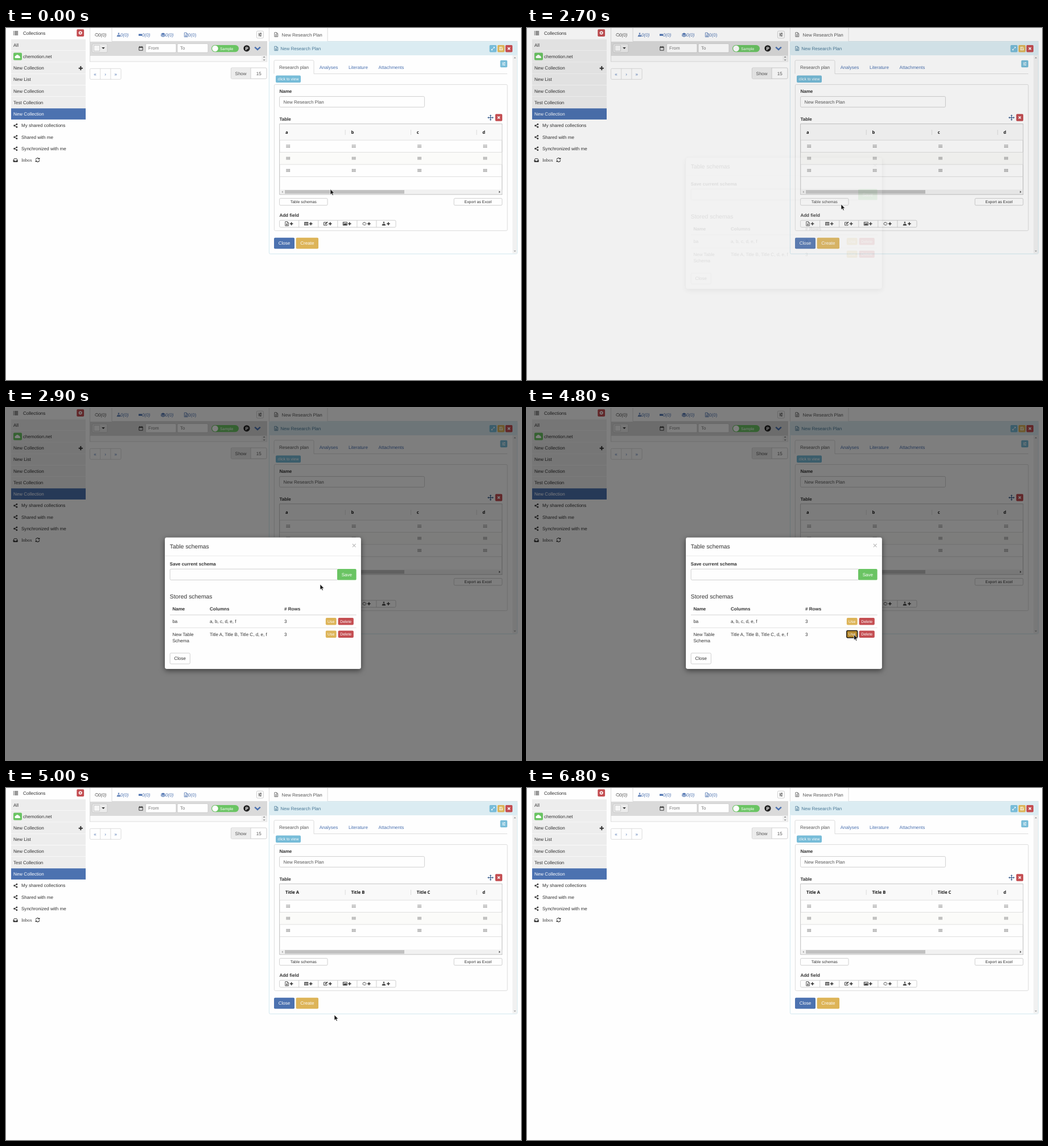
An HTML page for the animation above (7000 ms loop, 905 by 619 pixels).

```html
<!DOCTYPE html>
<html lang="en">
<head>
<meta charset="utf-8">
<title>Table schemas</title>
<style>
html, body { margin: 0; width: 100%; height: 100%; overflow: hidden; background: #fefefe; }
svg { display: block; }
text { font: 8.05px "Liberation Sans", Arial, sans-serif; text-rendering: geometricPrecision; white-space: pre; }
.s { font-size: 6.9px; }
.h { font-size: 10.35px; }
.b { font-weight: bold; }
.i { font-style: italic; }
.g { font: bold 7.6px "Open Sans", "Noto Sans", sans-serif; }
.f { font-family: "Liberation Serif", serif; }
#modal .panel { filter: drop-shadow(0 3px 5px rgba(0, 0, 0, .5)); }
</style>
</head>
<body>
<svg id="stage" width="905" height="619" viewBox="0 0 905 619"></svg>
<script>
const WHITE = '#fefefe', INK = '#333', GREY = '#555', LINE = '#d4d4d4', EDGE = '#c4c4c4';
const BLUE = '#4c72b0', RED = '#c44e52', GOLD = '#ddb458', GREEN = '#6ac463', CYAN = '#77bcd8';

const text = (x, y, str, fill = INK, cls = '', anchor = 'start') =>
  `<text x="${x}" y="${y}" fill="${fill}" class="${cls}" text-anchor="${anchor}">${str}</text>`;
const box = (x, y, w, h, fill = WHITE, stroke = 'none', r = 0, extra = '') =>
  `<rect x="${x}" y="${y}" width="${w}" height="${h}" rx="${r}" fill="${fill}" stroke="${stroke}" stroke-width=".8" ${extra}/>`;
const line = (d, stroke = LINE, w = .8) => `<path d="${d}" fill="none" stroke="${stroke}" stroke-width="${w}"/>`;
const button = (x, y, w, h, label, fill, color, stroke = 'none', cls = '', extra = '') =>
  box(x, y, w, h, fill, stroke, 1.9, extra) +
  text(x + w / 2, y + h / 2 + (cls ? 2.4 : 2.9), label, color, cls, 'middle');

// Icons are drawn around their own centre.
const icons = {
  list: c => line('M-2-3H4.2M-2-1H4.2M-2 1H4.2M-2 3H4.2', c, 1.2) + line('M-4.2-3h1.3M-4.2-1h1.3M-4.2 1h1.3M-4.2 3h1.3', c, 1.2),
  gear: c => `<circle r="2" fill="none" stroke="${c}" stroke-width="1.5"/><circle r="2.8" fill="none" stroke="${c}" stroke-width="1" stroke-dasharray="1.1"/>`,
  cloud: c => `<path d="M-3 3a2 2 0 0 1-.3-4 2.8 2.8 0 0 1 5.2-.6 2.2 2.2 0 0 1 2 2 1.4 1.4 0 0 1-.6 2.6z" fill="${c}"/>`,
  plus: c => line('M0-3.6V3.6M-3.6 0H3.6', c, 2),
  smallPlus: c => line('M0-2.8V2.8M-2.8 0H2.8', c, 1.6),
  share: c => line('M2.2-2.4L-2 0l4.2 2.4', c, 1) + [[2.2, -2.4], [-2, 0], [2.2, 2.4]].map(p => `<circle cx="${p[0]}" cy="${p[1]}" r="1.4" fill="${c}"/>`).join(''),
  inbox: c => `<path d="M-3.6 0L-2.2-2.6H2.2L3.6 0V2.8H-3.6z" fill="none" stroke="${c}"/><path d="M-3.6.2h2l.6 1.1h2l.6-1.1h2v2.6h-7.2z" fill="${c}"/>`,
  refresh: c => line('M-3.3-.4A3.3 3.3 0 0 1 2.6-2M3.3.4A3.3 3.3 0 0 1-2.6 2', c, 1.1) + `<path d="M3.8-4v3h-3zM-3.8 4v-3h3z" fill="${c}"/>`,
  ring: c => `<path d="M-1.6-2.2H1.6L3.2 0 1.6 2.2H-1.6L-3.2 0z" fill="none" stroke="${c}" stroke-width=".9" stroke-dasharray="3.2 .6"/>`,
  flask: c => `<path d="M-1.2-3H1.2M-.6-3V-.8L-3 2.7H3L.6-.8V-3" fill="none" stroke="${c}" stroke-width=".8"/><path d="M-1.7.8H1.7L3 2.7H-3z" fill="${c}"/>`,
  bar: c => box(-3, -1.5, 6, 3.2, c),
  stack: c => `<path d="M0-3.4L4-1.5 0 .4-4-1.5z" fill="${c}"/>` + line('M-4 0L0 1.8 4 0M-4 1.6L0 3.4 4 1.6', c, 1),
  file: c => `<path d="M-2.9-3.7H.8L2.9-1.6V3.7H-2.9z" fill="none" stroke="${c}" stroke-width=".8"/>` + line('M.7-3.6v2.1h2M-1.5 0h3M-1.5 1.3h3M-1.5 2.5h3', c, .7),
  sliders: c => line('M-3-2.2H3M-3 0H3M-3 2.2H3', c, .7) + line('M1.2-3v1.6M-1.2-.8V.8M.8 1.4V3', c, 1.3),
  calendar: c => `<path d="M-3.2-2.5H3.2V3.5H-3.2z" fill="none" stroke="${c}" stroke-width=".9"/>` + line('M-3.2-1.9H3.2', c, 1.6) + line('M-1.7-4v2M1.7-4v2', c, 1),
  chevron: c => line('M-4.8-2L0 2.4 4.8-2', c, 2.4),
  caret: c => `<path d="M-2.8-1.4H2.8L0 1.6z" fill="${c}"/>`,
  up: c => `<path d="M-2 1H2L0-1.2z" fill="${c}"/>`,
  down: c => `<path d="M-2-1H2L0 1.2z" fill="${c}"/>`,
  left: c => `<path d="M1-2V2L-1.2 0z" fill="${c}"/>`,
  right: c => `<path d="M-1-2V2L1.2 0z" fill="${c}"/>`,
  expand: c => line('M-2.2 2.2L2.2-2.2', c, .9) + `<path d="M3-3v2.8L.2-3zM-3 3V.2L-.2 3z" fill="${c}"/>`,
  save: c => `<path d="M-2.6-2.6H1.6L2.6-1.6V2.6H-2.6z" fill="none" stroke="${c}" stroke-width=".8"/>` + line('M-1.2-2.4v1.5h2v-1.5M-1.4 2.5V.7h2.8v1.8', c, .7),
  cross: c => line('M-2-2L2 2M2-2L-2 2', c, 1.6),
  move: c => line('M0-4V4M-4 0H4', c, 1.1) + `<path d="M0-5.4L1.9-3.2H-1.9zM0 5.4L1.9 3.2H-1.9zM-5.4 0L-3.2-1.9V1.9zM5.4 0L3.2-1.9V1.9z" fill="${c}"/>`,
  table: c => box(-3.5, -2.9, 7, 5.8, c) + line('M-3.2-.9H3.2M-3.2 1H3.2M-1.2-1.6V2.6M1.2-1.6V2.6', WHITE, .6),
  edit: c => line('M1.2-2.5H-3.2V2.8H2.3V.8', c, .9) + line('M-1 .9L3.3-3.2', c, 1.5),
  image: c => `<path d="M-3.6-2.8H3.6V2.8H-3.6z" fill="none" stroke="${c}" stroke-width=".9"/><path d="M-2.8 2.2V.8l1.4-1.4 1 1L1.5-1.4 2.8.2v2z" fill="${c}"/><circle cx="-1.8" cy="-1.2" r=".7" fill="${c}"/>`,
  dots: c => `<path d="M-3.2-1.9h6.6M-3.2 0h6.6M-3.2 1.9h6.6" stroke="${c}" stroke-width="1.1" stroke-dasharray="1.1 .7" fill="none"/>`
};
const icon = (name, x, y, color = INK) => `<g transform="translate(${x} ${y})">${icons[name](color)}</g>`;
const iconButton = (name, x, y, fill, size = 12.4) =>
  box(x, y, size, size, fill, 'none', 1.7) + icon(name, x + size / 2, y + size / 2, WHITE);

function sidebar() {
  const names = ['All', 'chemotion.net', 'New Collection', 'New List', 'New Collection', 'Test Collection',
    'New Collection', 'My shared collections', 'Shared with me', 'Synchronized with me'];
  let out = icon('list', 17, 9) + text(30, 12, 'Collections') + iconButton('gear', 124.3, 2.2, RED, 12.8);
  names.forEach((name, n) => {
    const y = 19.8 + 20.25 * n, on = n === 6, shared = n > 6;
    if (!shared) out += box(9, y, 131, 19.6, on ? BLUE : '#ededed');
    else out += icon('share', 16.7, y + 10.2);
    out += text(shared ? 27 : n === 1 ? 30 : 13, y + 12.8, name, on ? WHITE : INK);
  });
  return out + box(13, 43.5, 15, 13, GREEN, 'none', 1.8) + icon('cloud', 20.5, 50, WHITE) + icon('plus', 131.3, 70.7) +
    icon('inbox', 16.6, 232.4) + text(27, 235.4, 'Inbox', INK, 'f') + icon('refresh', 55.5, 232);
}

function listPanel() {
  const tabs = [['ring', 159.5, 162], ['flask', 198, 201], ['bar', 236, 239], ['stack', 276, 280], ['file', 316.3, 320]];
  let out = line('M147.5 24V0M186 0V23.5H459');
  tabs.forEach(([name, x, tx], n) => {
    const c = n ? BLUE : GREY;
    out += icon(name, x, 12, c) + text(tx, 15, '0(0)', c, n < 4 ? 'i' : '');
  });
  out += box(440.4, 5.4, 12, 12.4, WHITE, EDGE, 1.8) + icon('sliders', 446.4, 11.6);
  out += box(147, 24, 312, 24, '#dadada') + box(151.4, 28, 26.6, 15, '#ebebeb', EDGE, 1.8) +
    box(154.4, 30.6, 10, 10, '#f6f6f6', EDGE) + icon('caret', 171, 35.5) + icon('calendar', 237, 35.8) +
    box(245.4, 27.6, 53.6, 15.6, WHITE, EDGE, 1.8) + text(250, 38.3, 'From', '#777') +
    box(301, 27.6, 54, 15.6, WHITE, EDGE, 1.8) + text(306, 38.3, 'To', '#777') +
    box(361, 30, 48, 12.2, GREEN, 'none', 6.1) + `<circle cx="367.5" cy="36.1" r="5.3" fill="${WHITE}"/>` +
    text(376, 38.6, 'Sample', WHITE, 's') +
    `<circle cx="423" cy="35.8" r="5.6" fill="#222"/>` + text(423.1, 38.5, 'P', WHITE, 'b', 'middle') + icon('chevron', 442, 35.6, BLUE);
  out += box(147.4, 48.4, 311.2, 10.6, '#fafafa', LINE) + box(449, 48.6, 9.4, 10.2, '#f1f1f1') +
    icon('up', 453.6, 51, '#888') + icon('down', 453.6, 56.4, '#888');
  out += box(147.5, 71.3, 54.6, 19, WHITE, LINE, 1.9) + line('M165.7 71.3v19M183.9 71.3v19');
  ['«', '›', '»'].forEach((s, n) => out += text(156.6 + 18.1 * n, 83.8, s, BLUE, '', 'middle'));
  return out + box(395.4, 70, 62.6, 19.2, WHITE, EDGE, 1.9) + box(395.8, 70.4, 34, 18.4, '#ececec', 'none', 1.5) +
    line('M430 70v19.2', EDGE) + text(412.6, 83, 'Show', GREY, '', 'middle') + text(444.2, 83, '15', GREY, '', 'middle');
}

function grid() {
  let out = box(480.8, 168.8, 391, 124, WHITE, '#a9a9a9') + box(481.2, 169.2, 390.2, 28, '#f9f9f9') +
    box(481.2, 218.6, 390.2, 21.4, '#fbfbf9') + line('M481 197.2H871.5M481 218.5H871.5M481 240H871.5M481 261.4H871.5', '#d9d9d9') +
    line('M596.2 179v9M711.5 179v9M827 179v9');
  for (let col = 0; col < 4; col++) {
    const x = 491 + 115.4 * col;
    out += `<text class="g head" x="${x}" y="186" fill="#111"></text>`;
    for (let row = 0; row < 3; row++) out += icon('dots', x + 4.7, 207.7 + 21.4 * row, '#666');
  }
  return out + box(481.2, 284.2, 390.2, 8, '#f1f1f1') + icon('left', 485.6, 288.2, '#a0a0a0') +
    icon('right', 867.4, 288.2, '#444') + box(490, 285, 210, 6.4, '#c1c1c1', 'none', 0, 'id="thumb"');
}

function planPanel() {
  let out = line('M462.4 24V0M565 0V23.5H899') + icon('file', 474.8, 11.6, GREY) + text(484.6, 14.6, 'New Research Plan', GREY) +
    box(462.4, 23.8, 436.2, 373.4, WHITE, '#c6e2ec', 2) + box(462.8, 24.2, 435.4, 23.8, '#dbecf2', 'none', 2) +
    icon('file', 474.8, 36, '#4a7896') + text(482.2, 39, 'New Research Plan', '#4a7896') +
    iconButton('expand', 849.6, 30, CYAN) + iconButton('save', 863.7, 30, GOLD) + iconButton('cross', 877.6, 30, RED) +
    box(890, 48, 8.2, 348.6, '#f1f1f1') + icon('up', 894.2, 52.2, '#999') + icon('down', 894.2, 392.4, '#999');
  out += line('M471 80.5V58.8q0-2 2-2h66q2 0 2 2V80.5H881') + text(480, 71.7, 'Research plan', GREY);
  [['Analyses', 550.7], ['Literature', 602], ['Attachments', 654.6]].forEach(t => out += text(t[1], 71.7, t[0], BLUE));
  out += iconButton('sliders', 868.5, 56.8, CYAN) + button(474, 83.6, 44, 12.4, 'click to view', CYAN, WHITE, 'none', 's') +
    box(471.4, 99.4, 409.6, 257, WHITE, LINE, 1.9) + text(480.4, 114.4, 'Name', INK, 'b') +
    box(480.6, 120.4, 254.8, 18.8, WHITE, EDGE, 1.9) + text(487.6, 132.8, 'New Research Plan', GREY) +
    text(480.4, 162.8, 'Table', INK, 'b') + icon('move', 851.5, 157.6, '#3d6190') + iconButton('cross', 859.7, 151.3, RED) + grid();
  out += button(480.6, 299.6, 84.4, 12.2, 'Table schemas', WHITE, INK, EDGE, 's', 'id="schemas"') +
    button(787.2, 299.6, 84.6, 12.2, 'Export as Excel', WHITE, INK, EDGE, 's') + text(480.4, 332, 'Add field', INK, 'b') +
    box(480.6, 338.2, 204.4, 12.2, WHITE, EDGE, 1.9);
  ['file', 'table', 'edit', 'image', 'ring', 'flask'].forEach((name, n) => {
    const x = 480.6 + 34.06 * n;
    if (n) out += line(`M${x} 338.2v12.2`, EDGE);
    out += icon(name, x + 13, 344.2) + icon('smallPlus', x + 21, 344.2);
  });
  return out + button(471, 368.8, 36, 19.4, 'Close', BLUE, WHITE) + button(509.6, 368.8, 39.4, 19.4, 'Create', GOLD, WHITE);
}

function modal() {
  const row = (y, cells, cls) => cells.map((c, n) => text([292.4, 358, 489][n], y, c, INK, cls)).join('');
  const actions = (y, extra) => button(561.8, y, 18.8, 12.4, 'Use', GOLD, WHITE, 'none', 's', extra) +
    button(583.6, y, 27.2, 12.4, 'Delete', RED, WHITE, 'none', 's');
  return box(279, 227.6, 345, 231.4, WHITE, 'rgba(0,0,0,.2)', 3.4, 'class="panel"') +
    text(287.8, 247, 'Table schemas', INK, 'h') + line('M608.9 239l5.6 5.6M614.5 239l-5.6 5.6', '#bbb', 1.1) +
    line('M279 260H624', '#e2e2e2') + text(287.8, 277.4, 'Save current schema', INK, 'b') +
    box(288.2, 283.2, 295, 19.2, WHITE, EDGE, 1.9) + button(582, 283, 33.6, 19.6, 'Save', GREEN, WHITE) +
    text(287.8, 334.8, 'Stored schemas', INK, 'h') + row(356, ['Name', 'Columns', '# Rows'], 'b') +
    line('M288 363.8H615.6', '#dcdcdc', 1.2) + row(378.2, ['ba', 'a, b, c, d, e, f', '3']) + actions(369) +
    line('M288 386.5H615.6', '#dcdcdc') + row(400.6, ['New Table', 'Title A, Title B, Title C, d, e, f', '3']) +
    text(292.4, 412, 'Schema') + actions(391.5, 'id="use"') +
    button(288.2, 431, 35.2, 19, 'Close', WHITE, INK, EDGE);
}

const $ = id => document.getElementById(id);
$('stage').innerHTML = box(0, 0, 905, 619) + sidebar() + listPanel() + planPanel() +
  '<rect id="shade" width="905" height="619"/>' + `<g id="modal">${modal()}</g>` +
  `<g id="cursor"><path id="arrow" d="M0 0v9.6l2.2-2 1.5 3.3 1.6-.7-1.5-3.2h3z" fill="#151515" stroke="#fff" stroke-width=".6"/>
  <path id="hand" d="M-1 1a1 1 0 0 1 2 0v3l3.8.9q1.2.4 1 1.6L5 10.6H-1L-4.1 6.6q-.4-1.3.9-1.1L-1 6.8z" fill="#fff" stroke="#222" stroke-width=".9"/></g>`;

// Rows are [time, ...values]; values run linearly between rows.
const moves = [[0, 570, 283.4], [100, 569, 284], [300, 569, 284], [400, 567.5, 284.6], [700, 567.5, 284.6],
  [1000, 559, 301], [1400, 553, 309], [2600, 553, 309], [2700, 552, 310], [3000, 552, 310], [3400, 483, 345],
  [3600, 490, 385], [3800, 548, 400], [4000, 596, 398], [4200, 574, 399], [4800, 574.5, 398.6], [5000, 577, 399],
  [5400, 577, 399], [5600, 612, 330], [5800, 706, 190], [6000, 500, 60], [6200, 234, 22], [6500, -20, -14]];
const fades = [[2600, 0], [2700, .1], [2800, .5], [2900, 1], [4800, 1], [4900, .45], [5000, 0]];

function at(rows, t) {
  const n = rows.findIndex(r => r[0] > t);
  if (n < 1) return (n ? rows[rows.length - 1] : rows[0]).slice(1);
  const a = rows[n - 1], b = rows[n], k = (t - a[0]) / (b[0] - a[0]);
  return a.slice(1).map((v, j) => v + (b[j + 1] - v) * k);
}
const within = (t, from, to) => t >= from && t < to;
const paint = (el, fill, stroke) => { el.setAttribute('fill', fill); el.setAttribute('stroke', stroke); };
const heads = document.querySelectorAll('.head');

function draw(time) {
  const t = Math.floor(time % 7000 / 100) * 100;
  const [x, y] = at(moves, t), [fade] = at(fades, t);
  const hand = within(t, 1100, 2700) || within(t, 4100, 4800);
  $('cursor').setAttribute('transform', `translate(${x} ${y})`);
  $('hand').style.display = hand ? '' : 'none';
  $('arrow').style.display = hand ? 'none' : '';
  $('shade').style.opacity = fade / 2;
  $('modal').style.opacity = fade;
  $('modal').style.display = fade ? '' : 'none';

  $('thumb').setAttribute('fill', t === 100 ? '#b4b4b4' : within(t, 200, 900) ? '#a8a8a8' : '#c1c1c1');
  if (within(t, 2500, 2700)) paint($('schemas'), '#d4d4d4', '#8c8c8c');
  else if (within(t, 1100, 2500) || within(t, 5100, 6800)) paint($('schemas'), '#e4e4e4', '#a6a6a6');
  else paint($('schemas'), WHITE, EDGE);

  const pressed = within(t, 4700, 5000);
  paint($('use'), pressed ? '#b88a2c' : within(t, 4100, 4700) ? '#d19f34' : GOLD, pressed ? '#1c1710' : 'none');
  $('use').setAttribute('stroke-width', pressed ? 1.5 : .8);
  const titles = t < 4900 ? ['a', 'b', 'c', 'd'] : ['Title A', 'Title B', 'Title C', 'd'];
  heads.forEach((h, n) => { if (h.textContent !== titles[n]) h.textContent = titles[n]; });
}

const start = performance.now();
function tick() {
  draw(performance.now() - start);
  requestAnimationFrame(tick);
}
tick();
</script>
</body>
</html>
```
